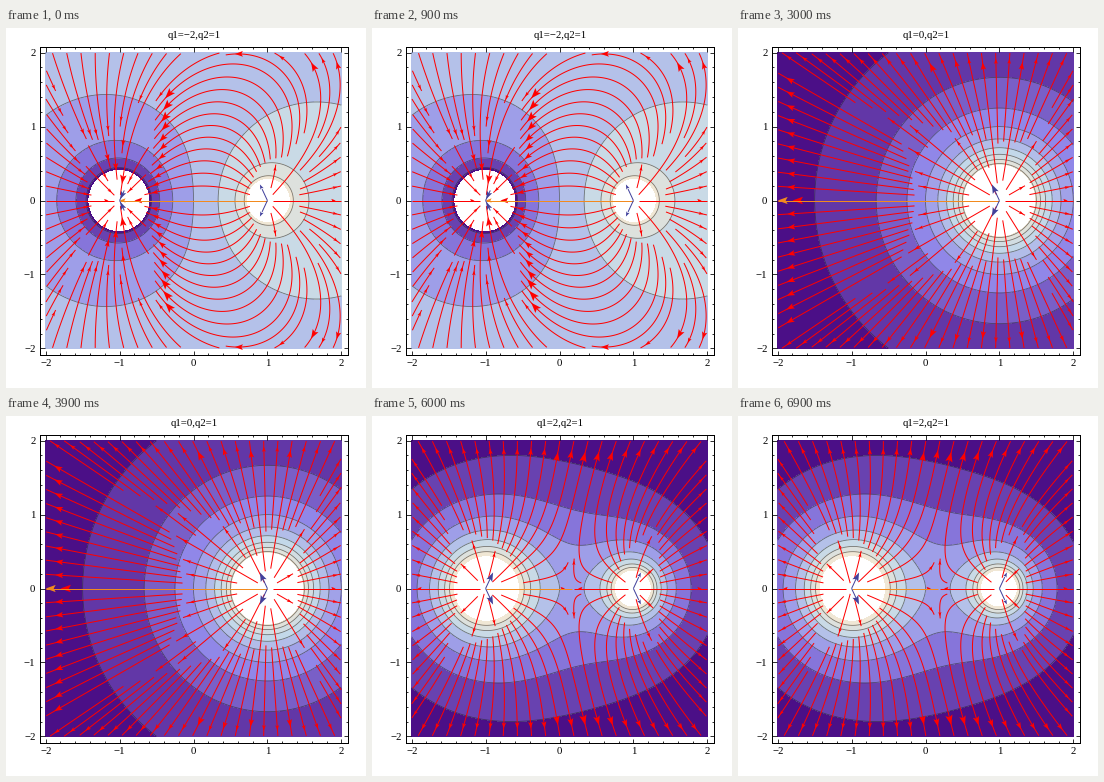
Write a matplotlib script that moves like this. It is 360 px wide and 360 px high and loops after 7500 ms.

```python
import matplotlib.pyplot as plt
import numpy as np
from matplotlib.animation import FuncAnimation
from matplotlib.collections import LineCollection, PolyCollection

SIZE, DPI = 360, 100
SCALE = 73.9                    # pixels per plot unit
PX = 72 / DPI                   # one pixel in points
LEFT, RIGHT, TOP, BOTTOM = 33.5, 341.5, 18.5, 326.5
HALF = (RIGHT - LEFT) / 2 / SCALE
FONT = dict(family="Liberation Serif", size=10.8 * PX)
RED, ORANGE, BLUE = "#ff0000", "#f28a1e", "#41419c"
LAKE = np.array([(0.293, 0.057, 0.529), (0.564, 0.528, 0.909),
                 (0.763, 0.847, 0.914), (0.941, 0.907, 0.834)])

# charge q1, lowest and highest drawn potential, contour step
SCENES = [(-2, -4.25, 2.35, 1.0), (-1, -2.22, 2.2, 0.5), (0, 0.2, 2.03, 0.2),
          (1, 0.5, 3.62, 0.5), (2, 1.0, 5.0, 0.5)]


def lake(t):
    return [np.interp(t, np.linspace(0, 1, 4), LAKE[:, k]) for k in range(3)]


def field(p, q):
    a, b = p - (-1, 0), p - (1, 0)
    ra = np.hypot(*a.T)[:, None] + 1e-9
    rb = np.hypot(*b.T)[:, None] + 1e-9
    return q * a / ra**3 + b / rb**3


def unit(p, q):
    e = field(p, q)
    return e / (np.hypot(*e.T)[:, None] + 1e-9)


def trace(seeds, q, sign, step=0.025, count=230):
    """Follow all field lines at once; stopped points become NaN."""
    p, out = seeds.copy(), []
    for _ in range(count):
        mid = p + sign * step / 2 * unit(p, q)
        p = p + sign * step * unit(mid, q)
        stop = np.abs(p).max(axis=1) > 2
        stop |= np.hypot(*(p - (1, 0)).T) < 0.07
        if q:
            stop |= np.hypot(*(p - (-1, 0)).T) < 0.07
        stop |= np.hypot(*field(p, q).T) < 0.04
        p[stop] = np.nan
        out.append(p)
    return np.stack(out, axis=1)


def make_seeds(q):
    mid = {-2: 0.35, 2: 0.2}.get(q, 0)
    axis = [(x, 0) for x in (-1.9, -0.5, 0.5, 1.9)]
    u = np.arange(0, 2, 0.19)
    edge = [(s * x, 1.97) for x in u for s in (1, -1)]
    edge += [(s * 1.97, y) for y in u[1:] for s in (1, -1)]
    column = [(mid, y) for y in np.arange(0.18, 2, 0.165)]
    ring = [(c + 0.3 * np.cos(a), 0.3 * np.sin(a))
            for a in np.pi * np.arange(1, 12) / 12 for c in (-1, 1)]
    fill = [(s * x, y) for y in np.arange(0.1, 2, 0.15)
            for x in np.arange(0.05, 2, 0.15) for s in (1, -1)]
    if q < 0:
        return np.array(axis + column + edge + ring + fill)
    return np.array(axis + edge + ring + column + fill)


def distance(p, others):
    d = p[:, None, :] - others[None]
    return np.sqrt((d**2).sum(axis=2).min(axis=1))


def streams(q, sep=0.13, near=0.075):
    seeds = make_seeds(q)
    ahead, back = trace(seeds, q, 1), trace(seeds, q, -1)
    taken, lines = np.array([(9.0, 9.0)]), []
    for seed, f, b in zip(seeds, ahead, back):
        if distance(seed[None], taken)[0] < sep:
            continue
        f, b = f[~np.isnan(f[:, 0])], b[~np.isnan(b[:, 0])]
        path = np.vstack([b[::-1], seed, f])
        k = len(b)
        bad = np.flatnonzero(distance(path, taken) < near)
        lo = max(bad[bad < k], default=-1) + 1
        hi = min(bad[bad > k], default=len(path))
        path = path[lo:hi]
        if len(path) < 7:
            continue
        taken = np.vstack([taken, path[::2]])
        lines.append(path)
        if seed[1] > 0 and np.abs(path[:, 1]).min() > 0.001:
            lines.append(path * (1, -1))
    return lines


def head(tip, angle, length):
    """Notched arrowhead, length in pixels."""
    c, s = np.cos(angle), np.sin(angle)
    shape = np.array([(0, 0), (-1, 0.36), (-0.8, 0), (-1, -0.36)])
    return tip + shape @ np.array([(c, s), (-s, c)]) * length / SCALE


def stream_head(path):
    k = max(2, int(0.94 * (len(path) - 1)))
    dx, dy = path[k] - path[k - 2]
    return head(path[k], np.arctan2(dy, dx), np.clip(len(path) * 0.105, 4.5, 10.5))


def add_lines(lines, heads, color, z):
    style = dict(zorder=z)
    return [ax.add_collection(LineCollection(lines, colors=color, linewidths=PX, **style),
                              autolim=False),
            ax.add_collection(PolyCollection(heads, facecolors=color, edgecolors="none",
                                             **style), autolim=False)]


def blue_marks(q):
    lines, heads = [], []
    for x, charge in ((-1, q), (1, 1)):
        if not charge:
            continue
        tilt = np.radians(65 if x < 0 or q > 0 else 115)
        for a in (tilt, -tilt):
            ray = np.array([np.cos(a), np.sin(a)])
            c = np.array([x, 0])
            if charge > 0:
                size = 9 if abs(q) < 2 or x < 0 else 5
                lines.append([c, c + 0.17 * ray])
                heads.append(head(c + 0.24 * ray, a, size))
            else:
                lines.append([c, c + 0.15 * ray])
                heads.append(head(c + 0.02 * ray, a + np.pi, 8))
    return lines, heads


def build(q, low, high, step):
    g = np.linspace(-2, 2, 500)
    x, y = np.meshgrid(g, g)
    v = q / np.hypot(x + 1, y) + 1 / np.hypot(x - 1, y)
    first = np.floor(low / step + 1e-6) + 1
    last = np.ceil(high / step - 1e-6) - 1
    levels = np.arange(first, last + 1) * step
    n = len(levels)
    art = [ax.contourf(x, y, v, [low, *levels, high], zorder=1,
                       colors=[lake(i / n) for i in range(n + 1)]),
           ax.contour(x, y, v, levels, colors=[(0.15, 0.15, 0.15, 0.6)],
                      linewidths=0.8 * PX, linestyles="solid", zorder=2)]

    lines = streams(q)
    art += add_lines(lines, [stream_head(p) for p in lines], RED, 3)

    span = {-2: (1, -1), -1: (1, -1), 0: (1, -2), 2: (-1, 0.17)}.get(q)
    if span:
        tips = [head((span[1], 0), np.pi, 10 if q == 0 else 6)] if q <= 0 else []
        art += add_lines([[(span[0], 0), (span[1], 0)]], tips, ORANGE, 4)
    art += add_lines(*blue_marks(q), BLUE, 5)

    label = f"q1={q},q2=1".replace("-", "\u2212")
    art.append(fig.text(188 / SIZE, 1 - 9.5 / SIZE, label, ha="center",
                        va="baseline", **FONT))
    return art


fig = plt.figure(figsize=(SIZE / DPI, SIZE / DPI), dpi=DPI, facecolor="white")
ax = fig.add_axes([LEFT / SIZE, 1 - BOTTOM / SIZE,
                   (RIGHT - LEFT) / SIZE, (BOTTOM - TOP) / SIZE])
scenes = [build(*s) for s in SCENES]

ax.set(xlim=(-HALF, HALF), ylim=(-HALF, HALF))
ax.set_xticks(range(-2, 3))
ax.set_yticks(range(-2, 3))
ax.set_xticks(np.arange(-10, 11) / 5, minor=True)
ax.set_yticks(np.arange(-10, 11) / 5, minor=True)
ax.tick_params(which="both", direction="in", top=True, right=True,
               width=0.8 * PX, pad=4 * PX)
ax.tick_params(which="major", length=4.5 * PX)
ax.tick_params(which="minor", length=2.5 * PX)
for text in ax.get_xticklabels() + ax.get_yticklabels():
    text.set(**FONT)
for spine in ax.spines.values():
    spine.set_linewidth(PX)


def update(i):
    for k, art in enumerate(scenes):
        for a in art:
            a.set_visible(k == i)
    return []


anim = FuncAnimation(fig, update, frames=len(SCENES), interval=1500,
                     repeat=True, repeat_delay=0, blit=False)
plt.show()
```
